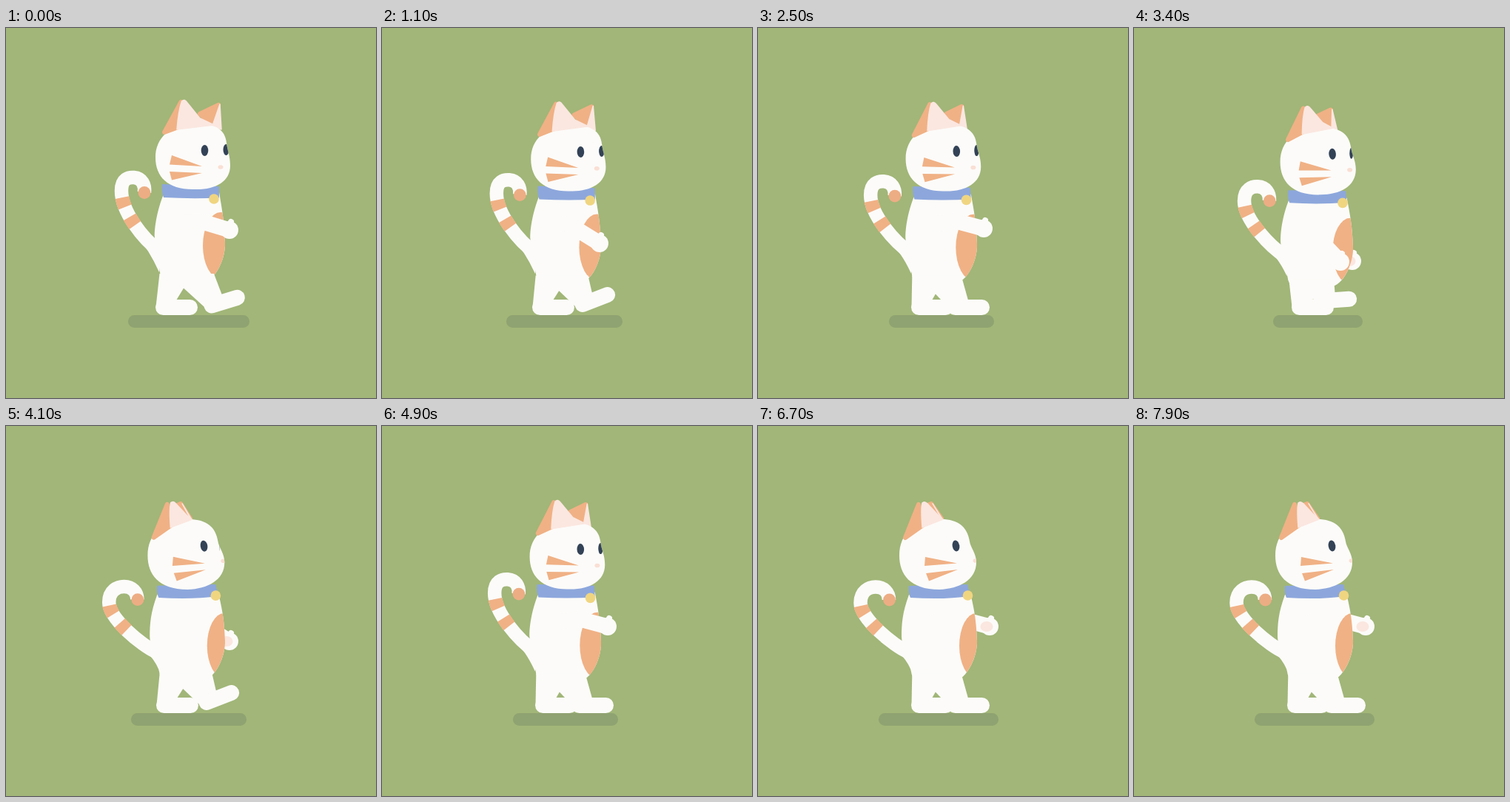
Recreate the animation shown at these times as an HTML page. Size 500 px wide and 500 px high, loop 8000 ms.

```html
<!DOCTYPE html>
<html lang="en">
<head>
<meta charset="utf-8">
<title>Walking cat</title>
<style>
  html, body { margin: 0; width: 100%; height: 100%; overflow: hidden; background: #a1b678; }
  svg { display: block; width: 100vw; height: 100vh; }
  .w { fill: #fcfbf9; }
  .o { fill: #f0b185; }
  .p { fill: #fbe7e0; }
  .e { fill: #334256; }
  .limb { fill: none; stroke: #fcfbf9; stroke-linejoin: round; stroke-linecap: round; }
  .ear { stroke-linejoin: round; }
  .ear.o { stroke: #f0b185; stroke-width: 6; }
  .ear.p { stroke: #fbe7e0; stroke-width: 1.5; }
</style>
</head>
<body>
<svg viewBox="0 0 500 500">
  <defs>
    <clipPath id="torsoClip"><path id="torsoEdge"/></clipPath>
    <clipPath id="headClip"><path id="headEdge"/></clipPath>
  </defs>
  <rect width="500" height="500" fill="#a1b678"/>
  <rect id="shadow" y="388" height="17" rx="8.5" fill="#8fa271"/>
  <g id="farArm">
    <path class="limb" stroke-width="21"/><circle class="w" r="12"/><path class="limb" stroke-width="8"/>
    <ellipse id="palm" class="p" rx="8.5" ry="7"/>
  </g>
  <g id="farLeg"><path class="w"/><path class="limb" stroke-width="21"/></g>
  <g id="body">
    <path id="tail" class="limb" stroke-width="18.5" style="stroke-linecap:butt"/>
    <path id="tailBase" class="w"/>
    <path id="bands" fill="none" stroke="#f0b185" stroke-width="19" pathLength="100" stroke-dasharray="0 31.5 8.5 9.5 8.5 200"/>
    <circle id="tailTip" r="8.4" fill="#edad84"/>
    <path id="torso" class="w"/>
    <g clip-path="url(#torsoClip)"><ellipse id="patch" class="o"/></g>
  </g>
  <g id="nearLeg"><path class="w"/><path class="limb" stroke-width="21"/></g>
  <g id="nearArm"><path class="limb" stroke-width="21"/><circle class="w" r="12"/><path class="limb" stroke-width="8"/></g>
  <g id="headGroup">
    <path id="collar" fill="#8da7dc"/>
    <path id="farEar" class="o ear"/>
    <path id="farEarIn" class="p ear"/>
    <path id="head" class="w"/>
    <path id="earOut" class="o ear"/>
    <path id="earIn" class="p ear"/>
    <path id="whiskers" class="o"/>
    <g clip-path="url(#headClip)">
      <ellipse id="farEye" class="e" ry="7.5"/>
      <ellipse id="nose" rx="3.5" ry="2.8" fill="#fadfd4"/>
    </g>
    <ellipse id="eye" class="e" rx="4.8" ry="7.5"/>
    <circle id="bell" r="6.8" fill="#f0d581"/>
  </g>
</svg>
<script>
const LOOP = 8000, STEP = 100, STEPS = 12;
const $ = id => document.getElementById(id);
const set = (el, attrs) => { for (const k in attrs) el.setAttribute(k, attrs[k]); };
const mix = (a, b, q) => b + (a - b) * q;

// Each shape: [turned toward the viewer, turned away]
const shapes = {
  tail: ['M208,302 C185,285 156,248 156,220 C156,203 166,201.5 173,202 C184,203 188,212 187,222',
         'M202,305 C185,298 138.5,261 138.5,239 C138.5,223 150,217.5 159,217.5 C170,217.5 177,225 177,235'],
  tailBase: ['M176,280 Q193,299 207,330 L212,288Z', 'M166,292 Q194,302 206,328 L208,292Z'],
  torso: ['M214,222 C203,248 200,275 201,283 C202,305 206,315 208,330 C209,340 215,343 225,343 L264,343 C284,343 297,310 296,290 C295,262 292,245 288,222Z',
          'M204,228 C195,252 194,268 194,285 C196,312 204,316 207,332 C208,342 215,345 225,345 L264,345 C283,343 297,310 296,290 C295,262 292,247 287,226Z'],
  collar: ['M211,211 L288,214 L288,229.5 Q250,231 213,229 Q210,222 211,211Z',
           'M204,216 L283,214 L287,230 Q250,235 206,232 Q203,226 204,216Z'],
  head: ['M202,175 C202,148 222,131 252,130 C278,128 296,134 298,155 C299,166 303,172 303,186 C303,208 282,219 255,218 C220,219 202,202 202,175Z',
         'M191,175 C191,145 212,127 248,126 C270,126 283,136 286,156 C287,164 295,172 295,184 C295,208 272,220 245,221 C205,221 191,200 191,175Z'],
  farEar: ['M262,116 L287,104 L278,131Z', 'M229,107 L234,105 L248,125Z'],
  farEarIn: ['M279,132 L289,103 L291,137Z', 'M249,127 L236,105 L251,129Z'],
  earOut: ['M214,141 L236.5,100 L233,134Z', 'M199,151 L217,106 L223,134Z'],
  earIn: ['M231,137 Q233,112 237.5,99 Q241,95 245,101 L262,122 L281,131Z',
          'M222,137 Q220,112 222,104 Q225,101 229,105 L244,121 L250,126Z'],
  whiskers: ['M224,172 L221,184.5 L265,187Z M221,194 L224,205.5 L265,196Z',
             'M226,177 L225,189 L269,185.5Z M227,199 L231,209.5 L270,194Z']
};

// One value per step of the walk cycle
const turn = [1, .78, .55, .32, .15, .04, 0, 0, .1, .3, .6, .93];
const shadowMid = [247, 248, 248, 248, 248, 247, 245, 244, 246, 248, 248.5, 246.5];
const shadowHalf = [82, 71, 62, 58, 61, 78, 83, 81, 72, 60, 60.5, 78.5];
const heelX = [271, 256, 243, 228, 213, 203, 202, 207, 215, 229, 245, 265];
const heelLift = [0, 0, 0, 0, 0, 0, 0, 0, 5, 9, 8, 1];
const footTilt = [-17, 0, 0, 0, 0, 0, 0, 0, 10, 6, -4, -21];
const handX = [302, 305, 302, 297, 287, 258, 232, 222, 232, 254, 279, 294];
const handY = [273, 271, 281, 297, 315, 328, 325, 320, 327, 328, 316, 291];

function morph([a, b], q) {
  const nums = b.match(/[\d.]+/g);
  let i = 0;
  return a.replace(/[\d.]+/g, n => mix(+n, +nums[i++], q).toFixed(2));
}

function drawLeg(id, k, bob) {
  const x = heelX[k], y = 388 - heelLift[k], a = footTilt[k] * Math.PI / 180;
  const at = (u, v) => `${x + u * Math.cos(a) - v * Math.sin(a)},${y + u * Math.sin(a) + v * Math.cos(a)}`;
  const reach = x - 202, hip = 332 + bob;
  const [leg, foot] = $(id).children;
  set(leg, { d: `M${207.5 + reach * .16},${hip} L${at(0.5, -11)} L${at(12, -2)} L${at(28, -20)} L${252 + reach * .42},${hip}Z` });
  set(foot, { d: `M${at(10.5, -10.5)} L${at(46.5, -10.5)}` });
}

function drawArm(id, k, dx, bob) {
  const x = handX[k] + dx, y = handY[k];
  const drop = 10 + Math.max(0, y - 270) * .7;
  const [arm, hand, thumb] = $(id).children;
  set(arm, { d: `M240,${262 + bob} L${Math.max(222, x - 40)},${y - drop} L${x},${y}` });
  set(hand, { cx: x, cy: y });
  set(thumb, { d: `M${x - 2},${y - 4} L${x + 2},${y - 11}` });
}

function draw(ms) {
  const k = Math.floor(ms % LOOP / STEP) % STEPS, opposite = (k + STEPS / 2) % STEPS;
  const q = turn[k];
  const bob = 4.75 * (1 - Math.cos(k * Math.PI / 3));
  const shift = `translate(0 ${bob - 2.4 * (1 - q)})`;

  for (const id in shapes) set($(id), { d: morph(shapes[id], q) });
  set($('bands'), { d: $('tail').getAttribute('d') });
  set($('torsoEdge'), { d: $('torso').getAttribute('d') });
  set($('headEdge'), { d: $('head').getAttribute('d') });
  set($('body'), { transform: shift });
  set($('headGroup'), { transform: shift });

  set($('tailTip'), { cx: mix(187, 177.5, q), cy: mix(222.5, 235, q) });
  set($('patch'), { cx: mix(290, 295, q), cy: mix(294, 297, q), rx: mix(24, 23, q), ry: mix(45, 44, q) });
  set($('eye'), { transform: `translate(${mix(268.5, 267.5, q)} ${mix(165.5, 162, q)}) rotate(${-10 * (1 - q)})` });
  set($('farEye'), { cx: mix(297.5, 288, q), cy: mix(164.5, 161, q), rx: 4 * q });
  set($('nose'), { cx: mix(290, 294, q), cy: mix(188, 182, q) });
  set($('bell'), { cx: mix(281, 283.5, q), cy: mix(231, 229, q) });

  set($('shadow'), { x: shadowMid[k] - shadowHalf[k], width: 2 * shadowHalf[k] });
  drawLeg('nearLeg', k, bob);
  drawLeg('farLeg', opposite, bob);
  drawArm('nearArm', k, 0, bob);
  drawArm('farArm', opposite, 8, bob);
  set($('palm'), { cx: handX[opposite] + 4, cy: handY[opposite] });
}

const start = performance.now();
function tick() {
  draw(performance.now() - start);
  requestAnimationFrame(tick);
}
tick();
</script>
</body>
</html>
```
